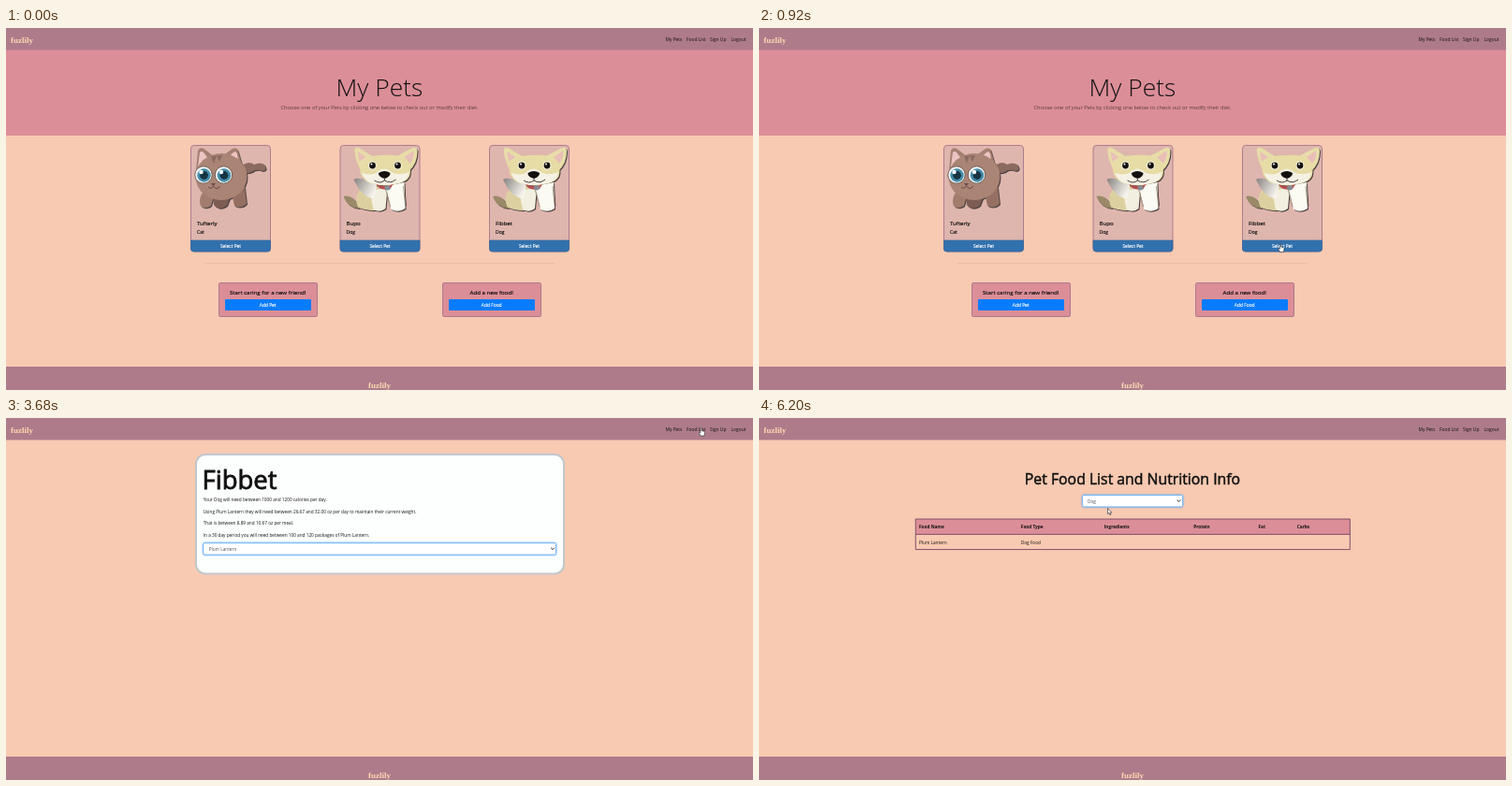
Write an HTML page that moves like this. It is 798x387 px and loops after 7.24 s.

```html
<!DOCTYPE html>
<html lang="en">
<head>
<meta charset="utf-8">
<title>Pet feeding planner</title>
<style>
  html, body { margin: 0; width: 100%; height: 100%; overflow: hidden; background: #f8cab2; }
  svg { display: block; width: 100%; height: 100%; }
  text { font: 4.74px "Open Sans", "Noto Sans", sans-serif; fill: #111; }
  .mid { text-anchor: middle; }
  .medium { stroke: #111; stroke-width: .03em; }
  .label { font-size: 4.9px; fill: #fff; stroke: #fff; stroke-width: .03em; }
  .heads text { font-weight: 700; }
  .nav { font-size: 4.9px; }
  .brand { font: 700 9px "Liberation Serif", serif; fill: #fcd7b0; }
  .hero { font-size: 26.4px; font-weight: 300; }
  .lead { font-size: 5.95px; font-weight: 300; }
  .name { font-size: 6.15px; }
  .kind { font-size: 5px; }
  .pet { font-size: 27.5px; }
  .ask { font-size: 8.7px; }
  .title { font-size: 15.8px; }
  .prompt { font-size: 11.5px; }
  .pink { fill: #dc8e98; }
  .mauve { fill: #ae7b8b; }
  .frame { stroke: #a8748a; stroke-width: .9; }
  .panel { fill: #fdfffe; stroke: #c1c7cb; stroke-width: 2; }
  .field { fill: #fff; stroke: #c3c9cf; stroke-width: .6; }
  .focus .field { stroke: #6fb2f2; stroke-width: .9; filter: drop-shadow(0 0 .8px #58a8ff); }
  .field + text { fill: #495057; }
  .chevron { fill: none; stroke: #222; stroke-width: 1; }
  .animal { filter: drop-shadow(1.6px 1.6px .7px #222c); }
</style>
</head>
<body>
<svg viewBox="0 0 798 387" preserveAspectRatio="none">
  <defs>
    <linearGradient id="shade" x2="1" y2=".5">
      <stop stop-color="#858281"/><stop offset=".6" stop-color="#cbc8c2"/><stop offset="1" stop-color="#f6f4ec"/>
    </linearGradient>

    <g id="cat" class="animal">
      <path d="M57 21Q63 17 68 21Q74 18 79 21Q83 27 77 28Q70 25 66 29Q61 31 56 30Z" fill="#8b6a5f"/>
      <path d="M12 52Q8 62 12 66Q17 69 22 65L25 55Z" fill="#a27c6d"/>
      <path d="M44 50L47 65Q54 69 60 63L58 45Z" fill="#957062"/>
      <path d="M24 52L25 64Q31 71 39 65L44 52Z" fill="#7d5d53"/>
      <path d="M6 27L8 6Q10 2 14 4L26 13ZM34 12L45 4Q50 2 51 7L56 24Z" fill="#a58072"/>
      <path d="M8 24L10 8Q12 6 14 8L20 16ZM39 14L46 8Q49 6 50 10L52 23Z" fill="#eec4c2"/>
      <ellipse cx="33" cy="34" rx="27.5" ry="25" fill="#aa8475"/>
      <path d="M22 12L25 20L28 11L31 18L34 11" fill="#8b6a5f"/>
      <g id="catEye">
        <circle cx="14" cy="32" r="9.2" fill="#f3f6f5" stroke="#594842" stroke-width=".8"/>
        <circle cx="14.5" cy="32.5" r="7.2" fill="#438ba8"/>
        <circle cx="14.5" cy="32.5" r="4.4" fill="#173442"/>
        <circle cx="11.5" cy="29" r="2.2" fill="#fff"/>
      </g>
      <use href="#catEye" x="21.5"/>
      <path d="M22 41L27 41L24.5 44Z" fill="#6a4744"/>
      <path d="M19 45Q22 48 24.5 44Q28 49 32 44" fill="none" stroke="#5b3e3b" stroke-width=".8"/>
    </g>

    <g id="dog" class="animal">
      <path d="M4 55Q11 53 18 61L21 68Q8 67 4 55Z" fill="#9a8a68"/>
      <path d="M23 46Q14 56 20 67Q32 72 44 69L44 44Z" fill="#ddd0a0"/>
      <path d="M32 49L36 69Q43 73 49 68L51 46Z" fill="#f3efe0"/>
      <path d="M15 37Q20 33 40 42L37 57Q25 58 15 37Z" fill="url(#shade)"/>
      <path d="M49 44L55 69Q63 73 70 68L69 40Z" fill="#fbfaf3"/>
      <path d="M49 47L54 66M68 44L70 64" fill="none" stroke="#9d907a" stroke-width=".9"/>
      <path d="M22 27Q15 11 16 4Q18 1 24 5L37 13ZM59 13L78 3Q83 2 83 7Q83 20 74 28Z" fill="#e8dda8"/>
      <path d="M21 18L19 7L28 13ZM69 13L79 6Q80 14 75 20Z" fill="#e9bfb8"/>
      <path d="M22 23Q27 10 48 11Q69 9 75 24Q78 38 63 41Q48 46 33 41Q20 36 22 23Z" fill="#e7dca5"/>
      <path d="M24 30Q36 34 41 28Q48 23 54 28Q62 34 74 29Q73 39 62 41Q48 45 34 41Q25 37 24 30Z" fill="#f5f2e5"/>
      <path d="M39 42Q48 46 57 42L54 47Q48 49 42 46Z" fill="#b64d50"/>
      <ellipse cx="51" cy="46" rx="3" ry="2.4" fill="#858c94"/>
      <g id="dogEye">
        <circle cx="35" cy="22" r="4.5" fill="#f7f4e5"/>
        <circle cx="35" cy="22" r="3.4" fill="#14100e"/>
        <circle cx="34" cy="20.5" r="1" fill="#fff"/>
      </g>
      <use href="#dogEye" x="27"/>
      <path d="M41.5 30Q48 26 54 30Q54 34 48 36Q41 34 41.5 30Z" fill="#14100e"/>
      <path d="M48 35L48 38M37 38Q43 42 48 38Q54 42 60 37" fill="none" stroke="#4b403a" stroke-width="1"/>
    </g>

    <g id="card">
      <rect x=".5" y=".5" width="85" height="113.5" rx="3.5" fill="#dfb6ae" class="frame"/>
      <path d="M.5 102H85.5V111Q85.5 114 82.5 114H3.5Q.5 114 .5 111Z" fill="#3171ae" stroke="#3a6699" stroke-width=".7"/>
      <text x="43" y="109.8" class="mid label">Select Pet</text>
    </g>
    <g id="box">
      <rect x=".5" y=".5" width="105" height="36" rx="1.4" class="pink frame"/>
      <rect x="7" y="18" width="92" height="12" rx="1.3" fill="#087cff"/>
    </g>
    <path id="chevron" class="chevron" d="M-1.8-.9L0 .9L1.8-.9"/>
  </defs>

  <rect width="798" height="387" fill="#f8cab2"/>

  <g id="home">
    <rect y="23" width="798" height="92" class="pink"/>
    <text x="399" y="73" class="hero mid">My Pets</text>
    <text x="399" y="87.3" class="lead mid">Choose one of your Pets by clicking one below to check out or modify their diet.</text>
    <g transform="translate(197 125)">
      <use href="#card"/><use href="#cat"/>
      <text x="7" y="86" class="name medium">Tufterly</text><text x="7" y="94.5" class="kind medium">Cat</text>
    </g>
    <g transform="translate(356.5 125)">
      <use href="#card"/><use href="#dog"/>
      <text x="7" y="86" class="name medium">Bupo</text><text x="7" y="94.5" class="kind medium">Dog</text>
    </g>
    <g transform="translate(516 125)">
      <use href="#card"/><use href="#dog"/>
      <text x="7" y="86" class="name medium">Fibbet</text><text x="7" y="94.5" class="kind medium">Dog</text>
    </g>
    <path d="M212 251.5H586" stroke="#dfb6a0" stroke-width=".6"/>
    <g transform="translate(227 272)">
      <use href="#box"/>
      <text x="52.7" y="13" class="name mid medium">Start caring for a new friend!</text>
      <text x="52.7" y="26" class="mid label">Add Pet</text>
    </g>
    <g transform="translate(466 272)">
      <use href="#box"/>
      <text x="52.7" y="13" class="name mid medium">Add a new food!</text>
      <text x="52.7" y="26" class="mid label">Add Food</text>
    </g>
  </g>

  <g id="detail">
    <rect id="panel" x="203" y="39" width="393" rx="10" class="panel"/>
    <text x="209.5" y="75.5" class="pet medium">Fibbet</text>
    <text x="210.7" y="89">Your Dog will need between 1000 and 1200 calories per day.</text>
    <text id="ask" x="210.7" y="104.5" class="ask medium">Select a Food to See Feeding Recomendation</text>
    <g id="advice">
      <text x="210.7" y="101.8">Using Plum Lantern they will need between 26.67 and 32.00 oz per day to maintain their current weight.</text>
      <text x="210.7" y="114.4">That is between 8.89 and 10.67 oz per meal.</text>
      <text x="210.7" y="127">In a 30 day period you will need between 100 and 120 packages of Plum Lantern.</text>
    </g>
    <g id="foodField">
      <rect x="210.8" y="109" width="376.7" height="12.4" rx="1.3" class="field"/>
      <text id="foodValue" x="216.7" y="117"></text>
      <use href="#chevron" x="584" y="115"/>
    </g>
  </g>

  <g id="list">
    <text x="399" y="71.3" class="title mid medium">Pet Food List and Nutrition Info</text>
    <g id="typeField">
      <rect x="345.6" y="82.5" width="107" height="12.4" rx="1.3" class="field"/>
      <text id="typeValue" x="351" y="90.7"></text>
      <use href="#chevron" x="448.5" y="88.5"/>
    </g>
    <text id="prompt" x="399" y="119" class="prompt mid medium">Choose A Pet Food Type From The Dropdown</text>
    <g id="table">
      <rect x="167.3" y="108" width="464" height="16.4" class="pink"/>
      <path d="M167.3 108H631.3V140.6H167.3ZM167.3 124.4H631.3" fill="none" stroke="#805068" stroke-width="1"/>
      <g class="heads">
        <text x="171" y="118">Food Name</text><text x="279.8" y="118">Food Type</text>
        <text x="368.8" y="118">Ingredients</text><text x="464.3" y="118">Protein</text>
        <text x="533.5" y="118">Fat</text><text x="574.8" y="118">Carbs</text>
      </g>
      <text x="171" y="134.5">Plum Lantern</text><text x="279.8" y="134.5">Dog Food</text>
    </g>
  </g>

  <rect width="798" height="23.5" class="mauve"/>
  <rect y="362" width="798" height="25" class="mauve"/>
  <text x="5" y="15.5" class="brand">fuzlily</text>
  <text x="399" y="384.5" class="brand mid">fuzlily</text>
  <text x="704.5" y="14" class="nav">My Pets</text>
  <text x="727" y="14" class="nav">Food List</text>
  <text x="752" y="14" class="nav">Sign Up</text>
  <text x="774.5" y="14" class="nav">Logout</text>

  <g id="cursor" fill="#fff" stroke="#222" stroke-width=".6" stroke-linejoin="round">
    <path id="arrow" d="M0 0V6.2L1.4 4.9L2.4 7.2L3.4 6.8L2.4 4.6H4.4Z"/>
    <path id="hand" d="M-.6 .4Q0-.4 .6 .4V3L3.4 3.8Q4.2 4.2 4 5.4L3.4 8.6H-.4L-2.2 5.4Q-2 4.2-.6 5.2Z"/>
  </g>
</svg>
<script>
  const LOOP = 7240;
  const OPEN_DETAIL = 1160, FOCUS_FOOD = 1760, PICK_FOOD = 2400;
  const OPEN_LIST = 3920, FOCUS_TYPE = 4800, PICK_TYPE = 5640;

  // Pointer stops: time, x, y
  const stops = [
    [40, 352, 66], [600, 541, 259], [840, 557, 231], [1160, 557, 231],
    [1560, 217, 110], [1760, 222, 114], [1960, 222, 114], [2280, 231, 134],
    [2880, 231, 134], [3600, 742.5, 10.5], [3920, 742.5, 10.5],
    [4640, 377, 90], [5240, 377, 90], [5520, 372.5, 96.5], [LOOP, 372.5, 96.5]
  ];

  const el = id => document.getElementById(id);
  const show = (id, on) => { el(id).style.display = on ? "" : "none"; };

  function pointerAt(t) {
    let i = 1;
    while (i < stops.length - 1 && stops[i][0] < t) i++;
    const [t0, x0, y0] = stops[i - 1], [t1, x1, y1] = stops[i];
    const p = Math.min(1, Math.max(0, (t - t0) / (t1 - t0)));
    const e = p * p * (3 - 2 * p);
    return [x0 + (x1 - x0) * e, y0 + (y1 - y0) * e];
  }

  function draw(t) {
    const home = t < OPEN_DETAIL, list = t >= OPEN_LIST;
    const fed = t >= PICK_FOOD, typed = t >= PICK_TYPE;
    show("home", home);
    show("detail", !home && !list);
    show("list", list);

    show("ask", !fed);
    show("advice", fed);
    el("panel").setAttribute("height", fed ? 127.5 : 103);
    el("foodField").setAttribute("transform", `translate(0 ${fed ? 24.7 : 0})`);
    el("foodField").classList.toggle("focus", t >= FOCUS_FOOD);
    el("foodValue").textContent = fed ? "Plum Lantern" : "Choose...";

    show("prompt", !typed);
    show("table", typed);
    el("typeField").classList.toggle("focus", t >= FOCUS_TYPE);
    el("typeValue").textContent = typed ? "Dog" : "Search By Food Type";

    const [x, y] = pointerAt(t);
    const onButton = home && x > 516 && x < 602 && y > 226 && y < 239;
    const onLink = y > 8 && y < 16 && x > 704 && x < 792;
    show("cursor", t >= 40);
    show("hand", onButton || onLink);
    show("arrow", !(onButton || onLink));
    el("cursor").setAttribute("transform", `translate(${x} ${y})`);
  }

  const start = performance.now();
  function tick() {
    const t = (performance.now() - start) % LOOP;
    draw(Math.floor(t / 40) * 40);
    requestAnimationFrame(tick);
  }
  tick();
</script>
</body>
</html>
```
